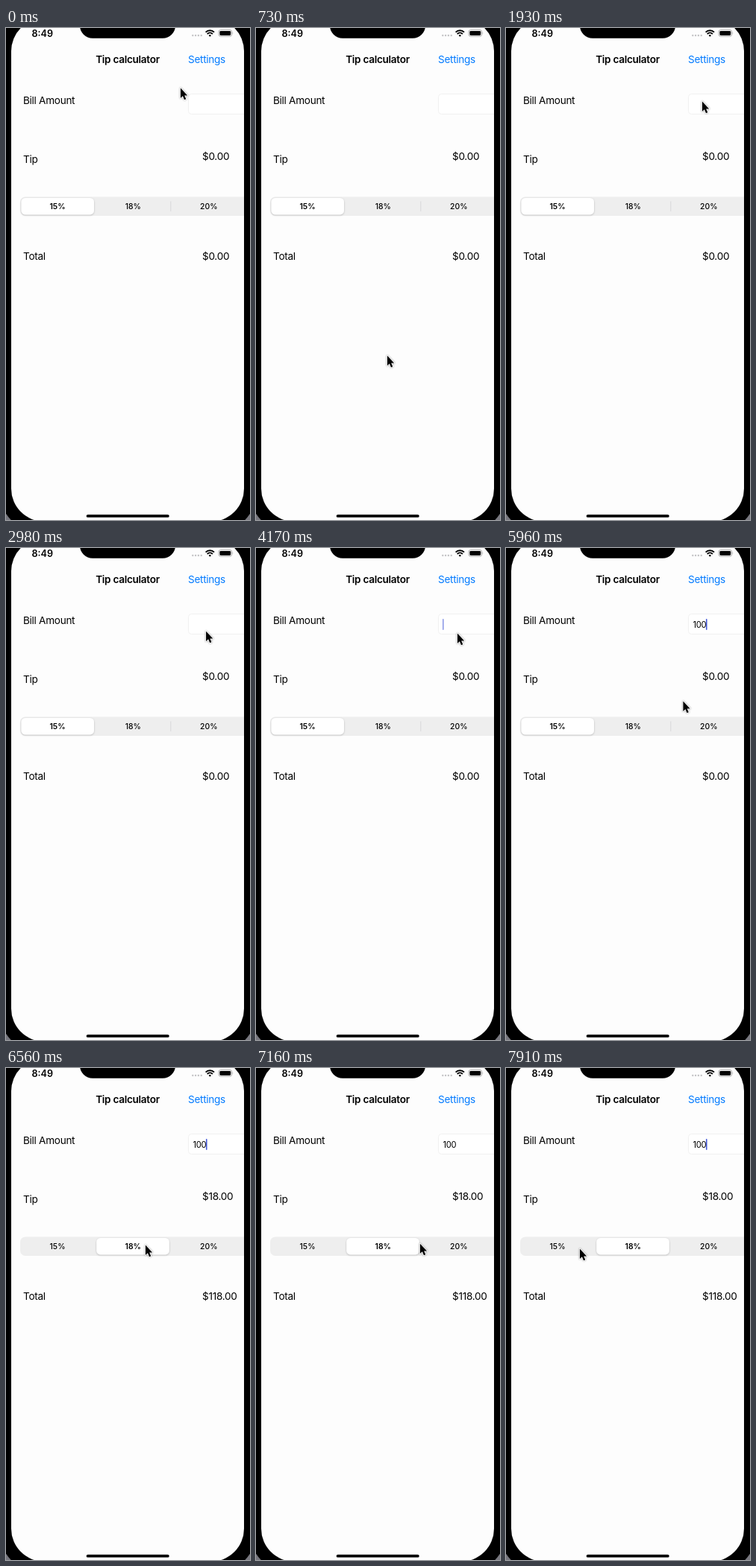
An HTML page for the animation above (8 s loop, 327x660 px).

```html
<!DOCTYPE html>
<html lang="en">
<head>
<meta charset="utf-8">
<title>Tip calculator</title>
<style>
  html, body { margin: 0; width: 100%; height: 100%; overflow: hidden; background: #77777f; }
  svg { display: block; width: 327px; height: 660px; }
  text { font: 13.6px Inter, "Liberation Sans", sans-serif; letter-spacing: -.022em; }
  .bold { font-weight: 600; }
  .mid { text-anchor: middle; }
  .seg { font-size: 10.4px; font-weight: 500; letter-spacing: 0; }
  .seg.on { font-weight: 560; }
  .field { font-size: 11.2px; }
  .time { font-size: 12.6px; letter-spacing: 0; }
</style>
</head>
<body>
<svg viewBox="0 0 327 660">
  <defs>
    <clipPath id="screen"><rect x="7" y="-13" width="312" height="675" rx="44"/></clipPath>
    <filter id="soft" x="-30%" y="-30%" width="160%" height="180%">
      <feDropShadow dx="0" dy=".8" stdDeviation=".8" flood-opacity=".25"/>
    </filter>
  </defs>
  <rect x="-10" y="-30" width="347" height="709" rx="61"/>
  <g clip-path="url(#screen)">
    <rect x="7" y="-13" width="312" height="675" fill="#fdfdfd"/>
    <rect x="99" y="-30" width="128" height="43.7" rx="17"/>

    <text class="bold time" x="34.5" y="11.5">8:49</text>
    <path d="M250.3 10H262" stroke="#c4c4c6" stroke-width="2.4" stroke-linecap="round" stroke-dasharray="0 3.8"/>
    <g fill="none" stroke="#000" stroke-width="1.9">
      <path d="M267.6 5.6A8.2 8.2 0 0 1 279 5.6M269.7 8A5.2 5.2 0 0 1 276.9 8"/>
      <path d="M273.3 11.8L271.6 9.9A2.4 2.4 0 0 1 275 9.9Z" fill="#000" stroke="none"/>
    </g>
    <rect x="285" y="2.5" width="17.6" height="8.8" rx="2.6" fill="none" stroke="#a5a5a5" stroke-width=".9"/>
    <rect x="286.4" y="3.9" width="14.8" height="6" rx="1.4"/>
    <path d="M303.7 5.3Q305 6.9 303.7 8.5Z" fill="#a5a5a5"/>

    <text class="bold mid" x="163" y="47">Tip calculator</text>
    <text x="244" y="47" fill="#007aff">Settings</text>
    <text x="23" y="102">Bill Amount</text>
    <text x="23" y="180.5">Tip</text>
    <text x="23" y="311">Total</text>
    <text id="tip" x="263" y="177"></text>
    <text id="total" x="263" y="311"></text>

    <rect x="244.5" y="88.5" width="100" height="27" rx="4" fill="#fff" stroke="#f0f0f0"/>
    <text class="field" id="bill" x="250.5" y="106.5"></text>
    <rect id="caret" y="95" width="1.6" height="15" rx=".8" fill="#4359d8"/>

    <rect x="19" y="226.5" width="330" height="25.5" rx="7" fill="#eee"/>
    <path id="divider" d="M220.8 232.5V246" stroke="#d8d8da"/>
    <rect id="pill" y="228" width="97.5" height="22.3" rx="5.5" fill="#fff" filter="url(#soft)"/>
    <text class="seg mid" x="69" y="243">15%</text>
    <text class="seg mid" x="170.3" y="243">18%</text>
    <text class="seg mid" x="271.8" y="243">20%</text>

    <rect x="107.7" y="652.8" width="111" height="3.8" rx="1.9"/>
  </g>
  <path id="cursor" d="M.9 1.6V15L3.9 12.2L6 17.2L8.3 16.2L6.2 11.4H10.2Z"
    stroke="#fff" stroke-width="1.7" paint-order="stroke" stroke-linejoin="round"
    style="filter:drop-shadow(0 .8px .8px #0006)"/>
</svg>
<script>
const LOOP = 8000, STEP = 149.2, LEAD = 20;   // the screen updates once per STEP
const FOCUS = 24, KEYS = [29, 36, 37], CLICK = 42, BLINK = 1000 / STEP;
const $ = id => document.getElementById(id);
const segs = document.querySelectorAll('.seg');

// Pointer strokes: first step, last step, end point.
const home = [233, 79];
const strokes = [
  [0, 2, 258, 105], [2, 5, 175, 438], [6, 10, 249, 97], [11, 13, 262, 97],
  [15, 16, 262, 102], [18, 21, 269, 113], [39, 40, 236.5, 204], [40, 42, 186, 236],
  [45, 47, 192, 231], [47, 50, 296, 243], [50, 53, 98, 241]
];

const clamp = v => Math.min(1, Math.max(0, v));
const ease = v => (v = clamp(v), v * v * (3 - 2 * v));
const money = n => '$' + n.toFixed(2);

function pointer(n) {
  let [x, y] = home;
  for (const [from, to, endX, endY] of strokes) {
    const k = ease((n - from) / (to - from));
    x += (endX - x) * k;
    y += (endY - y) * k;
  }
  return `translate(${x} ${y})`;
}

function draw(t) {
  const n = Math.floor((t + LEAD) / STEP);
  $('cursor').setAttribute('transform', pointer(n));

  const bill = '100'.slice(0, KEYS.filter(k => k <= n).length);
  $('bill').textContent = bill;

  // The caret stays lit after each key, then blinks once a second.
  const last = [FOCUS, ...KEYS].findLast(k => k <= n);
  const phase = (n - last) % BLINK;
  $('caret').setAttribute('x', 250 + (bill && $('bill').getComputedTextLength()));
  $('caret').setAttribute('opacity', last ? clamp((4.3 - phase) * 2) : 0);

  const picked = n > CLICK;
  const tip = picked ? bill * .18 : 0;
  $('tip').textContent = money(tip);
  $('total').textContent = money(picked ? +bill + tip : 0);
  $('pill').setAttribute('x', 20.5 + 100.8 * ease((n - CLICK) / 2));
  $('divider').setAttribute('opacity', picked ? 0 : 1);
  segs.forEach((s, i) => s.classList.toggle('on', i === +picked));
}

const start = performance.now();
function tick() {
  draw((performance.now() - start) % LOOP);
  requestAnimationFrame(tick);
}
tick();
</script>
</body>
</html>
```
